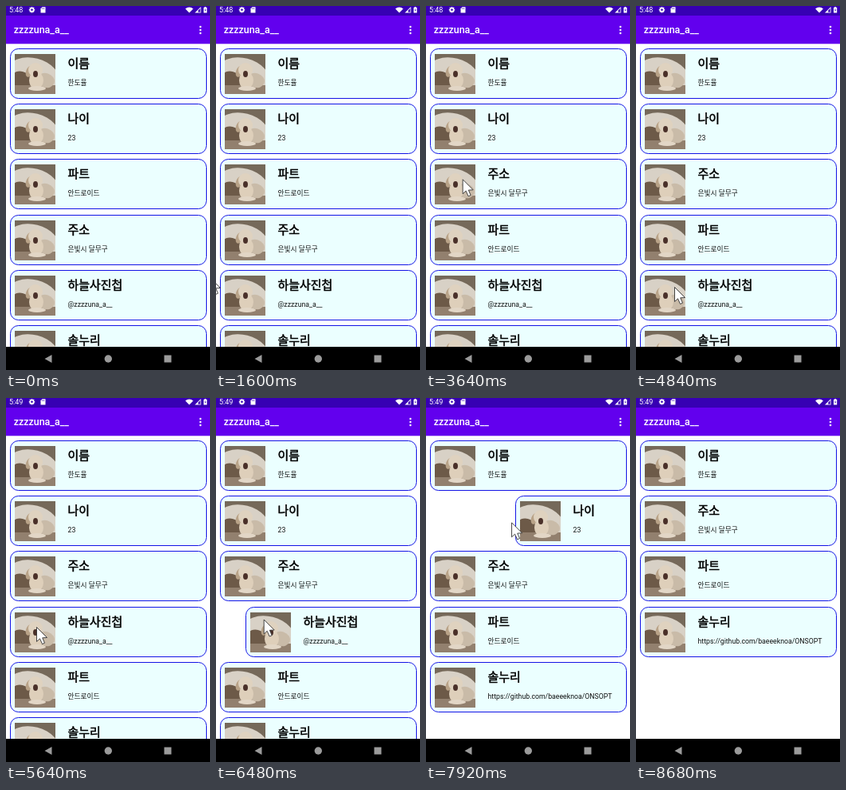
These frames come from a looping animation (256x455 px, 8760 ms). An HTML page with a canvas:

```html
<!DOCTYPE html>
<html lang="ko">
<head>
<meta charset="utf-8">
<title>Card list</title>
<style>
html, body { margin: 0; width: 100%; height: 100%; overflow: hidden; background: #fff; }
canvas { display: block; width: 256px; height: 455px; }
</style>
</head>
<body>
<canvas id="stage"></canvas>
<script>
const W = 256, H = 455, LOOP = 8760, STEP = 40;
const TOP = 54, PITCH = 69.2;
const FAMILY = 'Roboto, "Noto Sans CJK KR", "Noto Sans CJK", sans-serif';
const WHITE = '#fff', STATUS = '#3700b3', GREY = '#9b9b9b';
const canvas = document.getElementById('stage');
const ctx = canvas.getContext('2d');
const ratio = window.devicePixelRatio || 1;
canvas.width = W * ratio;
canvas.height = H * ratio;

const cards = [
  ['이름', '한도율'],
  ['나이', '23'],
  ['파트', '안드로이드'],
  ['주소', '은빛시 달무구'],
  ['하늘사진첩', '@zzzzuna_a__'],
  ['솔누리', 'https://github.com/baeeeknoa/ONSOPT']
];

// A drag lifts a card one row up, a swipe throws it out to the right.
const moves = [
  { time: 2880, card: 3, sway: 4 },
  { time: 4840, card: 4, sway: -10 },
  { time: 6400, card: 4, swipe: true },
  { time: 7760, card: 1, swipe: true }
];
const DRAG = 420, LAG = 60, SWIPE = 360, SHIFT = 250;

// Pointer stops: arrival in ms, x, y; each leg takes at most LEG.
const LEG = 360;
const stops = [
  [1600, -8, 339], [1900, 76, 345], [2200, 41, 291], [3250, 45, 213],
  [3960, 64, 310], [4400, 48, 351], [5200, 38, 286], [6000, 52, 367],
  [6160, 40, 276], [6760, 196, 280], [7040, 37, 231], [7240, 40, 170],
  [7600, 42, 152], [8120, 198, 160], [8600, 76, 428]
];

const clamp = u => Math.min(1, Math.max(0, u));
const ease = u => (u = clamp(u), u * u * (3 - 2 * u));

function layout(t) {
  const places = cards.map((_, i) => ({ x: 0, row: i }));
  for (const { time, card, sway, swipe } of moves) {
    if (t < time) break;
    const own = places[card], from = own.row, dt = t - time;
    if (swipe) {
      own.x = W * ease(dt / SWIPE);
      for (const p of places) {
        if (p.row > from) p.row -= ease((dt - SWIPE) / SHIFT);
      }
    } else {
      const u = clamp((dt - LAG) / DRAG);
      const neighbour = places.find(p => p.row === from - 1);
      own.row -= ease(u);
      own.x = sway * Math.sin(Math.PI * u);
      neighbour.row += ease((dt - LAG - DRAG / 2) / SHIFT);
    }
  }
  return places;
}

function pointerAt(t) {
  const i = stops.findIndex(s => s[0] > t);
  if (i < 0) return stops[stops.length - 1].slice(1);
  const [t0, x0, y0] = stops[i - 1], [t1, x1, y1] = stops[i];
  const begin = Math.max(t0, t1 - LEG);
  const s = ease((t - begin) / (t1 - begin));
  return [x0 + (x1 - x0) * s, y0 + (y1 - y0) * s];
}

function rect(color, x, y, w, h) {
  ctx.fillStyle = color;
  ctx.fillRect(x, y, w, h);
}

function poly(color, ...p) {
  ctx.beginPath();
  for (let i = 0; i < p.length; i += 2) ctx.lineTo(p[i], p[i + 1]);
  ctx.closePath();
  ctx.fillStyle = color;
  ctx.fill();
}

function oval(color, x, y, rx, ry = rx, turn = 0) {
  ctx.beginPath();
  ctx.ellipse(x, y, rx, ry, turn, 0, 7);
  ctx.fillStyle = color;
  ctx.fill();
}

function text(str, x, y, size, color, weight = 400) {
  ctx.font = `${weight} ${size}px ${FAMILY}`;
  ctx.fillStyle = color;
  ctx.fillText(str, x, y);
}

function drawPhoto() {
  ctx.save();
  ctx.beginPath();
  ctx.rect(0, 0, 51, 50);
  ctx.clip();
  rect('#75695a', 0, 0, 51, 50);
  oval('#d8d1c6', 23, 27, 33, 22, 0.25);
  oval('#6d5a48', 8, 33, 13, 11, 0.5);
  rect('#92806e', 0, 39, 51, 11);
  oval('#c9bba8', 39, 33, 11, 9, 0.3);
  oval('#decfba', 27, 33, 9, 11);
  oval('#b9a388', 18, 22, 4, 7, 0.3);
  oval('#dfd2bf', 26, 20, 9, 9);
  oval('#4a3029', 26, 25, 3, 4);
  oval('#e2d6c6', 28, 43, 11, 3);
  ctx.restore();
}

function drawCard([title, body], { x, row }) {
  const y = TOP + PITCH * row;
  if (x >= 251 || y > 426) return;
  ctx.save();
  ctx.translate(Math.round(x), Math.round(y) - 0.5);
  ctx.beginPath();
  ctx.roundRect(5.5, 0, 246, 62, 10);
  ctx.fillStyle = '#ebffff';
  ctx.fill();
  ctx.strokeStyle = '#1414e6';
  ctx.lineWidth = 1;
  ctx.stroke();
  text(title, 77.5, 23.3, 14.95, '#000');
  ctx.strokeStyle = '#000';
  ctx.lineWidth = 0.55;
  ctx.strokeText(title, 77.5, 23.3);
  text(body, 77.5, 45, 8.72, '#111');
  ctx.translate(11, 6.5);
  drawPhoto();
  ctx.restore();
}

function drawStatus(t) {
  rect(STATUS, 0, 0, W, 12);
  text(t < 5200 ? '5:48' : '5:49', 4, 8.2, 9, WHITE);

  // Gear
  for (let i = 0; i < 4; i++) {
    ctx.save();
    ctx.translate(32.5, 4.8);
    ctx.rotate(i * Math.PI / 4);
    rect(WHITE, -0.8, -3.7, 1.6, 7.4);
    ctx.restore();
  }
  oval(WHITE, 32.5, 4.8, 2.8);
  oval(STATUS, 32.5, 4.8, 1.3);

  // Memory card
  poly(WHITE, 45.5, 1.2, 49.5, 1.2, 49.5, 8.5, 43.5, 8.5, 43.5, 3.2);
  for (const x of [45.3, 47.2]) rect(STATUS, x, 2.5, 0.8, 1.5);

  // Wifi, signal and battery
  ctx.beginPath();
  ctx.moveTo(230, 8.5);
  ctx.arc(230, 8.5, 7, -Math.PI * 0.75, -Math.PI * 0.25);
  ctx.fillStyle = WHITE;
  ctx.fill();
  poly(WHITE, 244.5, 1, 244.5, 8.5, 237, 8.5);
  poly(STATUS, 243.7, 3, 243.7, 7.7, 241.3, 7.7, 241.3, 5.4);
  rect(WHITE, 248, 1.8, 4.2, 6.7);
  rect(WHITE, 249.2, 1, 1.8, 1);
  poly(STATUS, 250.5, 3, 249, 5.5, 250, 5.5, 249.7, 7.3, 251.2, 4.8, 250.2, 4.8);
}

function drawBars(t) {
  rect('#6200ee', 0, 12, W, 35.3);
  drawStatus(t);
  text('zzzzuna_a__', 9.7, 34.3, 12.46, WHITE, 500);
  for (const y of [26, 30, 34]) oval(WHITE, 244, y, 1.3);

  rect('#000', 0, 426, W, 29);
  poly(GREY, 48.5, 441, 57.5, 436, 57.5, 446);
  oval(GREY, 128.3, 441, 4.7);
  rect(GREY, 198.5, 436.5, 9, 9);
}

function drawPointer(t) {
  if (t < 1600 || t >= 8680) return;
  const [x, y] = pointerAt(t);
  ctx.save();
  ctx.translate(x + 0.5, y + 0.5);
  poly(WHITE, 0, 0, 0, 18, 4, 14.3, 7, 21, 10, 19.7, 7.2, 13.3, 13, 13);
  ctx.strokeStyle = '#333';
  ctx.lineWidth = 0.9;
  ctx.stroke();
  ctx.restore();
}

function frame(now) {
  const t = Math.floor((now % LOOP) / STEP) * STEP;
  ctx.setTransform(ratio, 0, 0, ratio, 0, 0);
  rect(WHITE, 0, 0, W, H);
  layout(t).forEach((place, i) => drawCard(cards[i], place));
  drawBars(t);
  drawPointer(t);
}

const start = performance.now();
function tick() {
  frame(performance.now() - start);
  requestAnimationFrame(tick);
}
tick();
</script>
</body>
</html>
```
